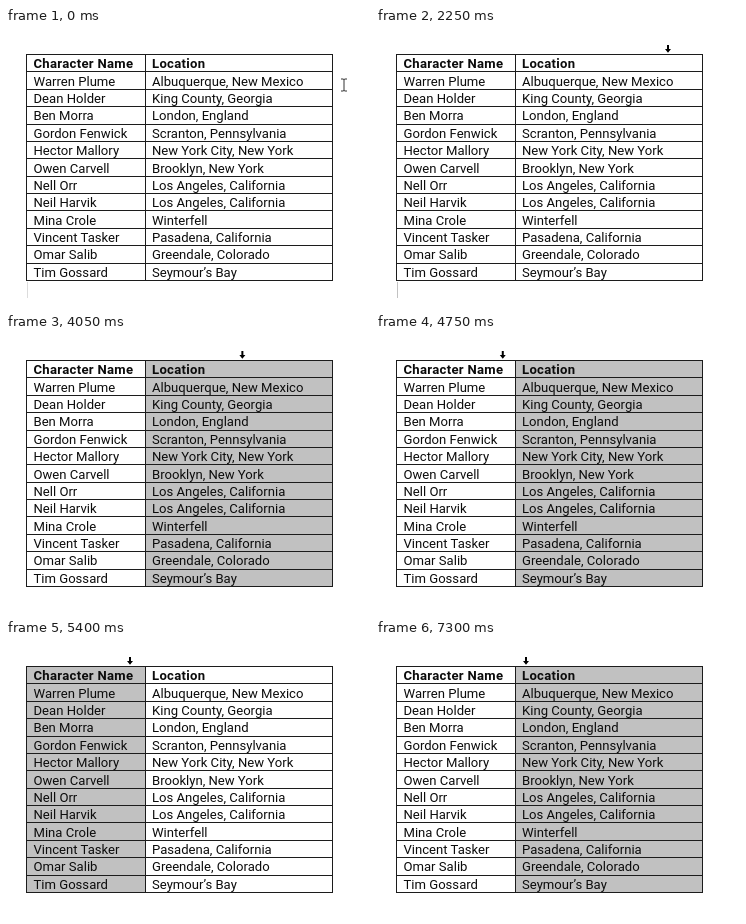
Animation of 364 by 278 pixels, one loop 8600 ms. Source, as an HTML page:

```html
<!DOCTYPE html>
<html lang="en">
<head>
<meta charset="utf-8">
<title>Selecting table columns</title>
<style>
  html, body { margin: 0; width: 100%; height: 100%; overflow: hidden; background: #fff; }
  svg { display: block; width: 100vw; height: 100vh; }
  text { font: 13.1px Roboto, "Open Sans", sans-serif; fill: #0c0c0c; }
  .head { font-weight: 700; letter-spacing: .3px; }
</style>
</head>
<body>
<svg viewBox="0 0 364 278">
  <rect width="364" height="278" fill="#fff"/>
  <g id="fills" fill="#c1c1c1"></g>
  <g id="grid" fill="#1c1c1c" shape-rendering="crispEdges"></g>
  <g id="cells"></g>
  <rect id="caret" x="21" y="254" width="1" height="16" fill="#999"/>
  <path id="beam" d="M-3-6H-1L0-5.5L1-6H3M0-5.5V5.5M-3 6H-1L0 5.5L1 6H3"
        fill="none" stroke="#333" stroke-width="1"/>
  <path id="arrow" d="M-1-8H1V-4H3L0-.2L-3-4H-1Z"/>
</svg>
<script>
const LOOP = 8600, LEFT = 20, SPLIT = 139, RIGHT = 326, TOP = 26, BOTTOM = 252;
const rows = [
  ["Character Name", "Location"],
  ["Warren Plume", "Albuquerque, New Mexico"],
  ["Dean Holder", "King County, Georgia"],
  ["Ben Morra", "London, England"],
  ["Gordon Fenwick", "Scranton, Pennsylvania"],
  ["Hector Mallory", "New York City, New York"],
  ["Owen Carvell", "Brooklyn, New York"],
  ["Nell Orr", "Los Angeles, California"],
  ["Neil Harvik", "Los Angeles, California"],
  ["Mina Crole", "Winterfell"],
  ["Vincent Tasker", "Pasadena, California"],
  ["Omar Salib", "Greendale, Colorado"],
  ["Tim Gossard", "Seymour’s Bay"]
];
const pitch = (BOTTOM - TOP) / rows.length;

const byId = id => document.getElementById(id);

function add(parent, tag, attrs, text = "") {
  const el = document.createElementNS("http://www.w3.org/2000/svg", tag);
  for (const key in attrs) el.setAttribute(key, attrs[key]);
  el.textContent = text;
  byId(parent).appendChild(el);
  return el;
}

const addRect = (parent, x, y, width, height) => add(parent, "rect", { x, y, width, height });

const columns = [
  addRect("fills", LEFT, TOP, SPLIT - LEFT, BOTTOM - TOP),
  addRect("fills", SPLIT, TOP, RIGHT - SPLIT, BOTTOM - TOP)
];

function buildTable() {
  for (let i = 0; i <= rows.length; i++)
    addRect("grid", LEFT, Math.round(TOP + i * pitch), RIGHT - LEFT + 1, 1);
  for (const x of [LEFT, SPLIT, RIGHT])
    addRect("grid", x, TOP, 1, BOTTOM - TOP + 1);
  rows.forEach((row, i) => row.forEach((text, col) =>
    add("cells", "text", { x: col ? 146 : 27.5, y: 40.2 + i * pitch, class: i ? "" : "head" }, text)));
}

const progress = (t, start, end) => Math.min(1, Math.max(0, (t - start) / (end - start)));

function glide(t, start, end) {
  const p = progress(t, start, end);
  return p * p * (3 - 2 * p);
}

// A click fades one column in while the other fades out.
const FADE = 80;
const fadeIn = (t, click) => 1 - (1 - progress(t, click, click + FADE)) ** 2;
const fadeOut = (t, click) => 1 - progress(t, click, click + FADE) ** 2;

function draw(t) {
  const first = Math.min(fadeIn(t, 4952), fadeOut(t, 6010));
  const second = Math.max(Math.min(fadeIn(t, 2986), fadeOut(t, 4952)), fadeIn(t, 6010));
  columns[0].setAttribute("opacity", first);
  columns[1].setAttribute("opacity", second);

  const approach = glide(t, 50, 1800);
  const x = 338 - 46 * approach - 168 * glide(t, 3550, 4850) + 26 * glide(t, 5400, 6000);
  const y = 57 - 32 * approach;
  const shown = t < 1850 ? "beam" : "arrow";
  for (const id of ["beam", "arrow"]) {
    byId(id).setAttribute("transform", `translate(${x} ${y})`);
    byId(id).setAttribute("visibility", id === shown ? "visible" : "hidden");
  }

  const blink = Math.max(0, Math.sin((t + 60) / 1100 * 2 * Math.PI));
  byId("caret").setAttribute("opacity", t < 2950 ? blink : 0);
}

function frame(now) {
  draw(now % LOOP);
  requestAnimationFrame(frame);
}

buildTable();
draw(0);
requestAnimationFrame(frame);
</script>
</body>
</html>
```
